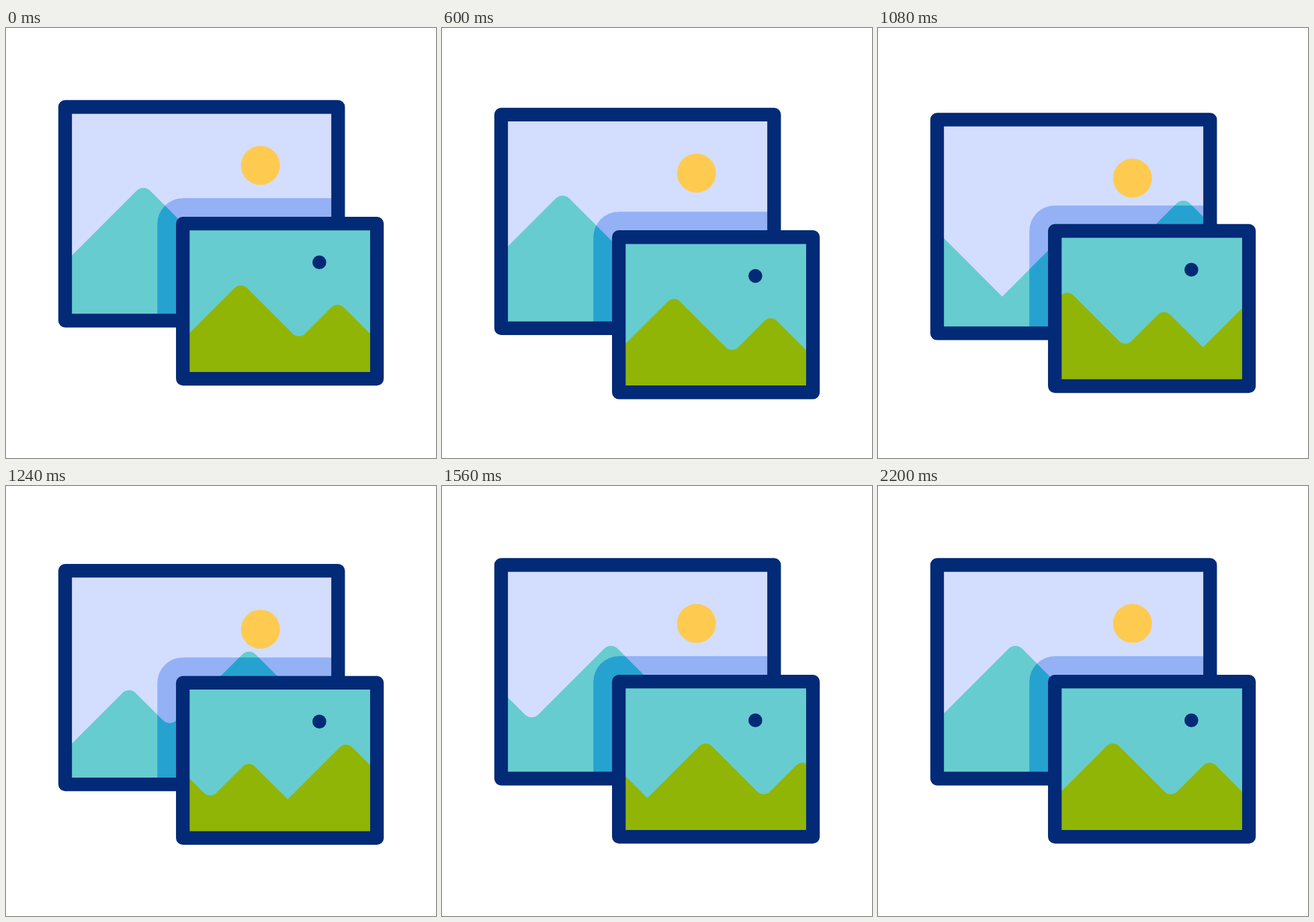
An HTML page with a canvas for the animation above (2.52 s loop, 640 by 640 pixels).

```html
<!DOCTYPE html>
<html lang="en">
<head>
<meta charset="utf-8">
<title>Pictures</title>
<style>
html, body { margin: 0; width: 100%; height: 100%; overflow: hidden; background: #fff; }
canvas { display: block; width: 640px; height: 640px; }
</style>
</head>
<body>
<canvas id="stage" width="640" height="640"></canvas>
<script>
const ctx = document.getElementById('stage').getContext('2d');
const LOOP = 2520, STEP = 40;
const NAVY = '#032a76', SKY = '#d3ddfe', TEAL = '#66cccf', GREEN = '#90b506',
      SUN = '#fecb50', SHADE = '#93b1f4', SHADE_TEAL = '#26a2d0';

// Ridge points of one period: x, y, corner radius
const bigRidge = { period: 418, points: [[204.5, 232.2, 14], [353, 380.7, 0], [444, 289.7, 14], [504.5, 350.2, 14]] };
const smallRidge = { period: 288.5, points: [[349.5, 377.8, 13], [435.9, 464.2, 13], [493.5, 406.6, 13], [551.35, 464.45, 0]] };

const clamp = v => Math.min(1, Math.max(0, v));
const smooth = v => v * v * (3 - 2 * v);
const progress = (t, from, to) => clamp((t - from) / (to - from));

// Ease in and out with horizontal handles at x1 and x2
function ease(x, x1, x2) {
  let lo = 0, hi = 1;
  for (let i = 0; i < 30; i++) {
    const m = (lo + hi) / 2, n = 1 - m;
    if (3 * x1 * m * n * n + 3 * x2 * m * m * n + m ** 3 < x) lo = m; else hi = m;
  }
  return smooth(lo);
}

const bob = (t, a, b, c, d) => 26.4 * (smooth(progress(t, a, b)) - smooth(progress(t, c, d)));

function disc(x, y, r, color) {
  ctx.fillStyle = color;
  ctx.beginPath();
  ctx.arc(x, y, r, 0, 2 * Math.PI);
  ctx.fill();
}

function ridgePath({ period, points }, shift) {
  const all = [-1, 0, 1, 2].flatMap(k => points.map(([x, y, r]) => [x + k * period - shift, y, r]));
  const path = ctx;
  path.beginPath();
  path.moveTo(all[0][0], 700);
  path.lineTo(all[0][0], all[0][1]);
  for (let i = 1; i < all.length - 1; i++) {
    const [x, y, r] = all[i], [nx, ny] = all[i + 1];
    path.arcTo(x, y, nx, ny, r);
  }
  path.lineTo(all[all.length - 1][0], 700);
  path.closePath();
}

function fillRidge(ridge, shift, color) {
  ridgePath(ridge, shift);
  ctx.fillStyle = color;
  ctx.fill();
}

// Draws the content clipped to the frame's middle line, then the frame
function picture(x, y, w, h, dy, color, content) {
  ctx.save();
  ctx.translate(0, dy);
  ctx.save();
  ctx.beginPath();
  ctx.rect(x, y, w, h);
  ctx.clip();
  ctx.fillStyle = color;
  ctx.fillRect(x, y, w, h);
  content();
  ctx.restore();
  ctx.strokeStyle = NAVY;
  ctx.lineWidth = 20.3;
  ctx.lineJoin = 'round';
  ctx.strokeRect(x, y, w, h);
  ctx.restore();
}

function draw(t) {
  const bigY = bob(t, 373, 872, 872, 1466);
  const smallY = bob(t, 272, 752, 762, 1332);
  const bigShift = bigRidge.period * ease(progress(t, 100, 2200), 0.667, 0.333);
  const smallShift = smallRidge.period * ease(progress(t, 360, 2200), 0.671, 0.307);

  ctx.fillStyle = '#fff';
  ctx.fillRect(0, 0, 640, 640);

  picture(88, 117.5, 406.3, 318, bigY, SKY, () => {
    fillRidge(bigRidge, bigShift, TEAL);
    disc(378.8, 204.6, 29, SUN);
    ctx.beginPath();
    ctx.roundRect(225.3, 253.3 + smallY - bigY, 400, 400, 38);
    ctx.clip();
    ctx.fillStyle = SHADE;
    ctx.fillRect(0, 0, 640, 640);
    fillRidge(bigRidge, bigShift, SHADE_TEAL);
  });

  picture(263.2, 291.1, 288.9, 231, smallY, TEAL, () => {
    fillRidge(smallRidge, smallShift, GREEN);
    disc(466.4, 348.8, 10.3, NAVY);
  });
}

const start = performance.now();
function tick() {
  const t = (performance.now() - start) % LOOP;
  draw(Math.floor(t / STEP) * STEP);
  requestAnimationFrame(tick);
}
tick();
</script>
</body>
</html>
```
